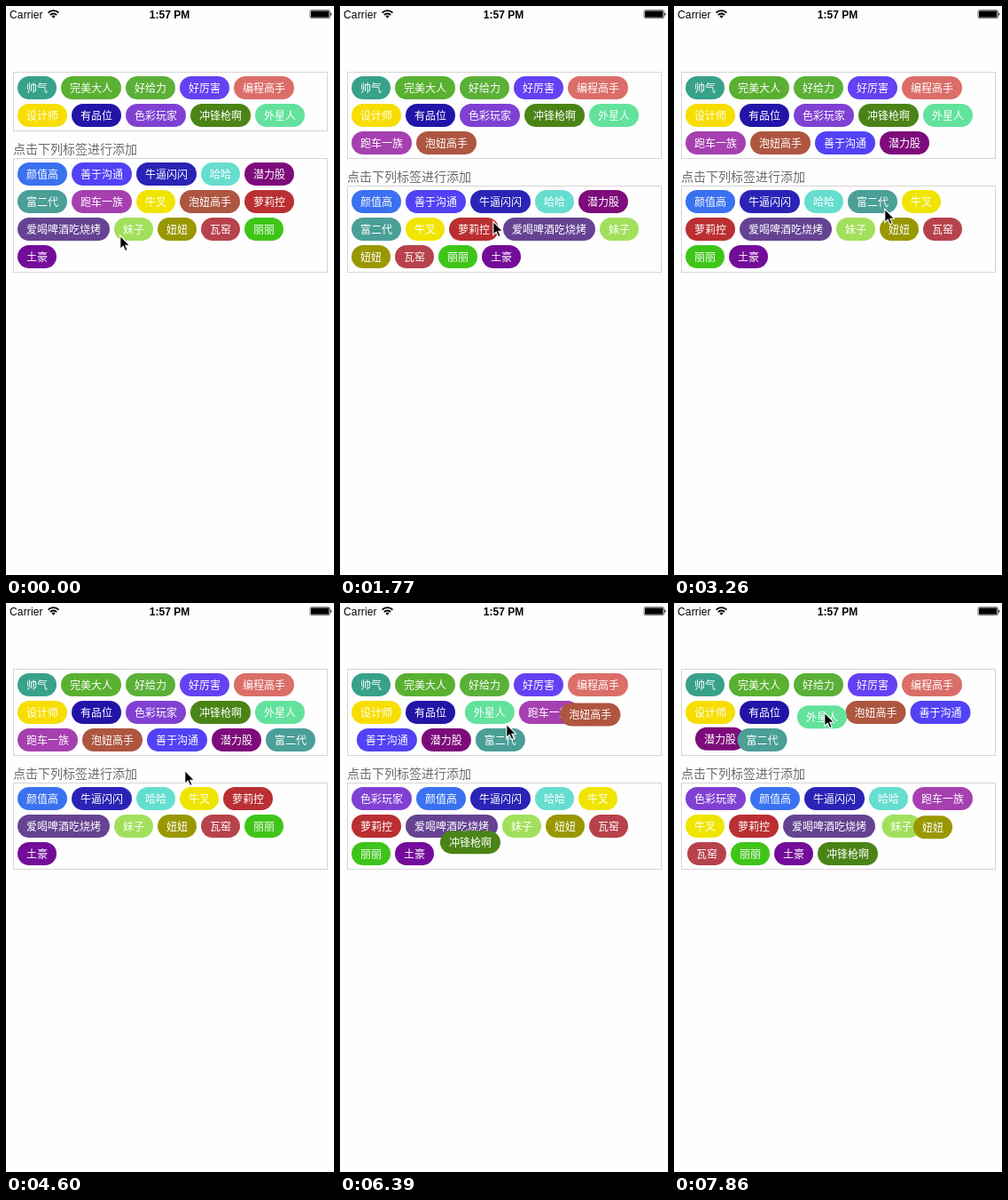
Write an HTML page that moves like this. It is 370 px wide and 640 px high and loops after 8 s.

```html
<!DOCTYPE html>
<html lang="zh-CN">
<head>
<meta charset="utf-8">
<title>标签</title>
<style>
html, body { margin: 0; width: 100%; height: 100%; overflow: hidden; background: #fefefe; }
#stage { position: relative; width: 370px; height: 640px; overflow: hidden; background: #fefefe;
  font-family: "Noto Sans CJK SC", "Noto Sans CJK", sans-serif; }
#stage > * { position: absolute; left: 0; top: 0; }
.bar { width: 370px; height: 20px; font-family: "Liberation Sans", Arial, sans-serif; }
.box { box-sizing: border-box; left: 8px !important; width: 355px; border: 1px solid #d6d6d6; }
#hint { left: 8px !important; font-size: 14px; line-height: 28px; color: #6c6c6c; white-space: nowrap; }
.tag { height: 26px; line-height: 26px; border-radius: 13px; font-size: 12px; color: #fff;
  text-align: center; white-space: nowrap; }
#cursor { width: 16px; height: 22px; z-index: 99; overflow: visible; }
</style>
</head>
<body>
<div id="stage">
  <svg class="bar" viewBox="0 0 370 20">
    <text x="4" y="13.6" font-size="12" letter-spacing=".15">Carrier</text>
    <text x="184.5" y="13.6" font-size="12" font-weight="700" text-anchor="middle">1:57 PM</text>
    <g fill="none" stroke="#000" stroke-width="1.9">
      <path d="M47.6 7.6a8.2 8.2 0 0 1 11.8 0"/>
      <path d="M49.9 10a5 5 0 0 1 7.2 0"/>
    </g>
    <path d="M53.5 13.8l-2.1-2.2a3 3 0 0 1 4.2 0z"/>
    <rect x="343" y="4.7" width="22.4" height="9" rx="1.6" fill="#fefefe" stroke="#000" stroke-width=".6"/>
    <rect x="344" y="5.6" width="20.4" height="7.2" rx=".6"/>
    <path d="M366.3 7.6a1.7 1.7 0 0 1 0 3.2z"/>
  </svg>
  <div class="box" id="upper"></div>
  <div id="hint">点击下列标签进行添加</div>
  <div class="box" id="lower"></div>
  <svg id="cursor" viewBox="0 0 16 22">
    <path d="M.8 1.4V16.4L4.3 13.2 6.6 18.6 9.2 17.5 6.9 12.2H11.4Z" stroke="#fff" stroke-width="1.1"/>
  </svg>
</div>
<script>
const LOOP = 8000, TICK = LOOP / 54, MOVE = 300;
const TOP = 74, LEFT = 13, RIGHT = 358, TAG_H = 26, GAP = 5, HINT_H = 30;

// Key order is the order tags take inside the lower box.
const COLORS = {
  帅气: '#38a18a', 完美大人: '#5ab031', 好给力: '#5bb038', 好厉害: '#6441f2', 编程高手: '#db6e68',
  设计师: '#f7de00', 有品位: '#2314a8', 色彩玩家: '#8041d3',
  颜值高: '#3a71f0', 善于沟通: '#5142f5', 牛逼闪闪: '#2a23b6', 哈哈: '#66decf', 潜力股: '#7d0b7b',
  富二代: '#4a9f97', 跑车一族: '#a640b0', 牛叉: '#f0e500', 泡妞高手: '#ae5640', 萝莉控: '#ba2f31',
  爱喝啤酒吃烧烤: '#654392', 外星人: '#62e29c', 妹子: '#a2e05c', 妞妞: '#999800', 瓦窑: '#b7424c',
  丽丽: '#3fc51a', 土豪: '#730c99', 冲锋枪啊: '#4b8416'
};
const NAMES = Object.keys(COLORS);
const PICKED = '帅气 完美大人 好给力 好厉害 编程高手 设计师 有品位 色彩玩家 冲锋枪啊 外星人'.split(' ');

const CLICKS = [
  [520, '跑车一族'], [1420, '泡妞高手'], [2250, '善于沟通'], [2770, '潜力股'], [3480, '富二代'],
  [5380, '色彩玩家'], [6130, '冲锋枪啊'], [6900, '跑车一族'], [7809, '外星人']
];

// time, x, y of the pointer tip
const PATH = [
  [0, 128, 257], [480, 112, 224], [750, 118, 226], [1330, 173, 241], [1480, 174, 243], [1775, 172, 241],
  [1930, 172, 241], [2230, 112, 222], [2380, 118, 220], [2665, 245, 206], [2900, 243, 212],
  [3258, 237, 227], [3500, 222, 226], [4296, 192, 224], [4592, 201, 187], [4742, 201, 187],
  [5185, 172, 108], [5400, 168, 118], [5925, 187, 135], [6371, 187, 135], [6850, 222, 122],
  [7050, 220, 122], [7851, 169, 122]
];

const $ = id => document.getElementById(id);
const mix = (a, b, p) => a + (b - a) * p;
const clamp = v => Math.max(0, Math.min(1, v));
const smooth = s => s * s * (3 - 2 * s);
const place = (el, x, y) => el.style.transform = `translate(${x}px, ${y}px)`;
const widthOf = name => name.length * 12 + 20;

// cubic-bezier(.42, 0, .58, 1)
function ease(x) {
  let lo = 0, hi = 1;
  for (let i = 0; i < 24; i++) {
    const s = (lo + hi) / 2, r = 1 - s;
    if (1.26 * r * r * s + 1.74 * r * s * s + s ** 3 < x) lo = s; else hi = s;
  }
  return x <= 0 ? 0 : x >= 1 ? 1 : smooth(lo);
}

function flow(list, top, pos) {
  let x = LEFT, y = top + GAP;
  for (const name of list) {
    const w = widthOf(name);
    if (x + w > RIGHT) { x = LEFT; y += TAG_H + GAP; }
    pos[name] = { x, y };
    x += w + GAP;
  }
  return y + TAG_H + GAP;
}

function layout(up, low) {
  const pos = {};
  const end = flow(up, TOP, pos);
  return { pos, end, bottom: flow(low, end + HINT_H, pos) };
}

function buildStates() {
  let up = PICKED, low = NAMES.filter(n => !up.includes(n)), z = NAMES.length;
  let order = Object.fromEntries([...up, ...low].map((n, i) => [n, i + 1]));
  const list = [{ ...layout(up, low), order }];
  for (const [, name] of CLICKS) {
    up = up.includes(name) ? up.filter(n => n !== name) : [...up, name];
    low = NAMES.filter(n => !up.includes(n));
    order = { ...order, [name]: ++z };
    list.push({ ...layout(up, low), order });
  }
  return list;
}

const states = buildStates();
const tags = {};
for (const name of NAMES) {
  const el = document.createElement('div');
  el.className = 'tag';
  el.textContent = name;
  el.style.width = widthOf(name) + 'px';
  el.style.background = COLORS[name];
  $('stage').append(tags[name] = el);
}

function pointer(t) {
  let i = PATH.length - 1;
  while (i && PATH[i][0] > t) i--;
  const a = PATH[i], b = PATH[i + 1] || a;
  const p = a === b ? 0 : smooth(clamp((t - a[0]) / (b[0] - a[0])));
  place($('cursor'), mix(a[1], b[1], p), mix(a[2], b[2], p));
}

function draw(t) {
  const done = CLICKS.filter(c => c[0] <= t).length;
  const to = states[done], from = states[Math.max(0, done - 1)];
  const p = done ? ease((t - CLICKS[done - 1][0]) / MOVE) : 1;
  for (const name of NAMES) {
    const a = from.pos[name], b = to.pos[name];
    place(tags[name], mix(a.x, b.x, p), mix(a.y, b.y, p));
    tags[name].style.zIndex = to.order[name];
  }
  const end = Math.round(mix(from.end, to.end, p));
  const bottom = Math.round(mix(from.bottom, to.bottom, p));
  place($('upper'), 0, TOP);
  $('upper').style.height = end - TOP + 'px';
  place($('hint'), 0, end + 5);
  place($('lower'), 0, end + HINT_H);
  $('lower').style.height = bottom - end - HINT_H + 'px';
  pointer(t);
}

const start = performance.now();
function frame(now) {
  const t = Math.max(0, now - start) % LOOP;
  draw(Math.min(53, Math.floor((t + 9) / TICK)) * TICK);
  requestAnimationFrame(frame);
}
draw(0);
requestAnimationFrame(frame);
</script>
</body>
</html>
```
